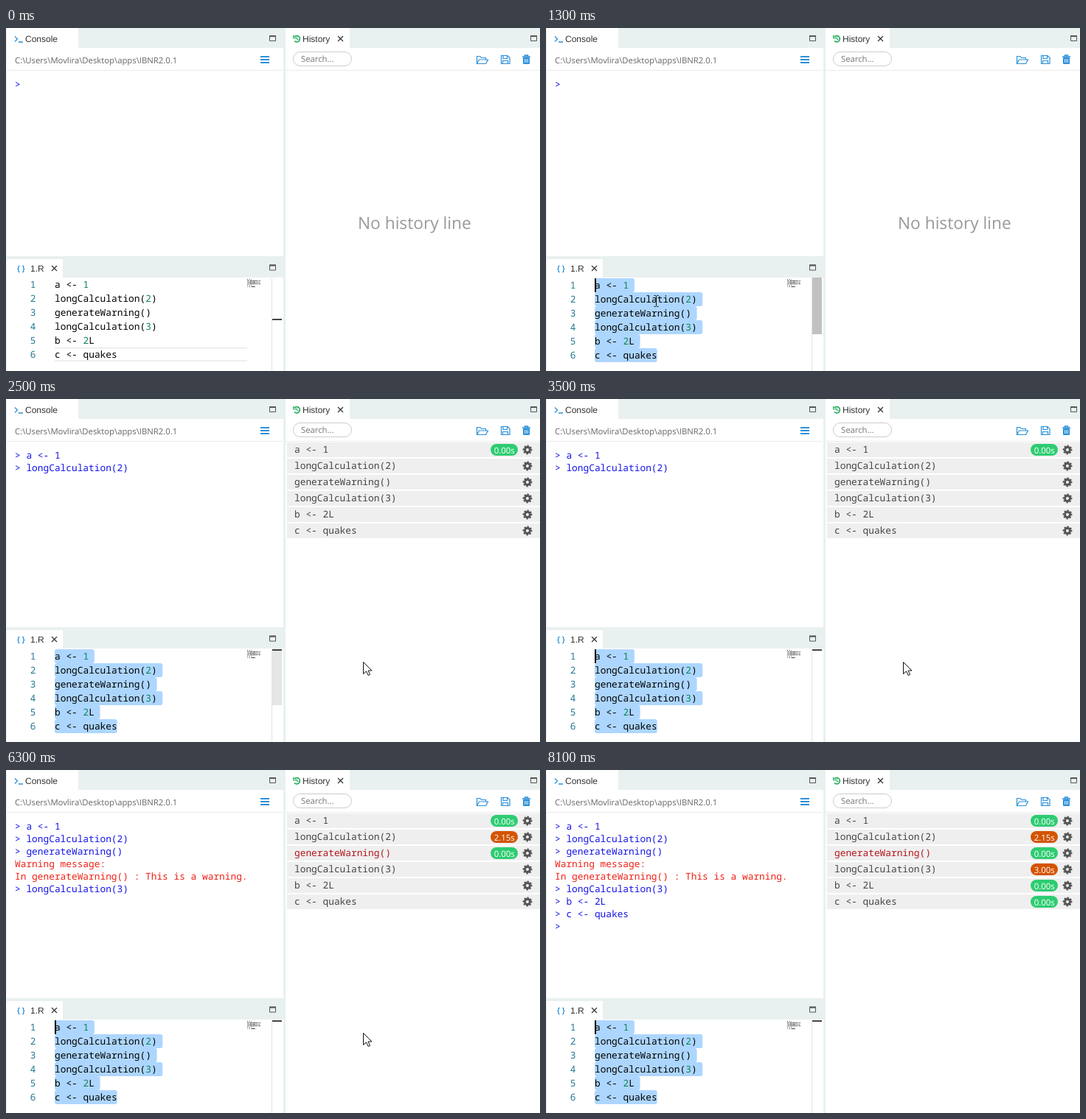
Recreate the animation shown at these times as an HTML page with a canvas. Size 724 by 466 pixels, loop 8200 ms.

```html
<!DOCTYPE html>
<html lang="en">
<head>
<meta charset="utf-8">
<title>Console history</title>
<style>
html, body { margin: 0; width: 100%; height: 100%; overflow: hidden; background: #fff; }
canvas { display: block; }
</style>
</head>
<body>
<canvas id="stage" width="724" height="466"></canvas>
<script>
const ctx = document.getElementById('stage').getContext('2d');
const LOOP = 8200, STEP = 100;
const MONO = '12.83px "Noto Sans Mono", monospace';
const LABEL = '12px "Liberation Sans", Arial, sans-serif';
const sans = size => `${size}px "Open Sans", sans-serif`;
const CHAR = 7.7;
const BLUE = '#2b90d9', BAR = '#e9f0f0';

// Times of the events, in ms
const CLICK = 400, SELECT = 1200, RUN = 1600, WARN = 3600, DONE = 6400;

const code = ['a <- 1', 'longCalculation(2)', 'generateWarning()',
  'longCalculation(3)', 'b <- 2L', 'c <- quakes'];
const timings = [[RUN, '0.00s'], [WARN, '2.15s'], [WARN, '0.00s'],
  [DONE, '3.00s'], [DONE, '0.00s'], [DONE, '0.00s']];
const output = [
  [RUN, '> ' + code[0]], [RUN, '> ' + code[1]], [WARN, '> ' + code[2]],
  [WARN, 'Warning message:'], [WARN, 'In generateWarning() : This is a warning.'],
  [WARN, '> ' + code[3]], [DONE, '> ' + code[4]], [DONE, '> ' + code[5]], [DONE, '>']
];

// Pointer path: time, x, y
const path = [[100, 370, 252], [200, 330, 300], [300, 230, 360], [400, 160, 387],
  [600, 190, 430], [700, 205, 443], [900, 149, 371], [1800, 149, 371], [1900, 215, 384],
  [2000, 307, 386], [2100, 423, 368], [2200, 465, 359], [2300, 484, 357],
  [7200, 484, 357], [7300, 510, 357], [7400, 575, 352], [7600, 694, 268]];

function rect(x, y, w, h, color) {
  ctx.fillStyle = color;
  ctx.fillRect(x, y, w, h);
}

function pill(x, y, w, h, r, fill, stroke) {
  ctx.beginPath();
  ctx.roundRect(x, y, w, h, r);
  if (fill) { ctx.fillStyle = fill; ctx.fill(); }
  if (stroke) { ctx.strokeStyle = stroke; ctx.lineWidth = 1; ctx.stroke(); }
}

function text(str, x, y, font, color, align = 'left') {
  ctx.font = font;
  ctx.textAlign = align;
  ctx.fillStyle = color;
  ctx.fillText(str, x, y);
}

function line(d, color, width = 1, fill) {
  const p = new Path2D(d);
  if (fill) { ctx.fillStyle = fill; ctx.fill(p); }
  ctx.strokeStyle = color;
  ctx.lineWidth = width;
  ctx.stroke(p);
}

function cross(x, y) {
  line(`M${x - 3.5} ${y - 3.5}l7 7m0 -7l-7 7`, '#333', 1.2);
}

function maximize(x, y) {
  line(`M${x - 4} ${y - 3.5}h8v7h-8z`, '#555');
  rect(x - 4.5, y - 4, 9, 2, '#555');
}

function gear(x, y) {
  ctx.strokeStyle = '#555';
  for (const [r, w, dash] of [[3.5, 3, []], [5.4, 2, [2.3, 1.94]]]) {
    ctx.beginPath();
    ctx.setLineDash(dash);
    ctx.lineWidth = w;
    ctx.arc(x, y, r, -0.2, Math.PI * 2 - 0.2);
    ctx.stroke();
  }
  ctx.setLineDash([]);
}

function drawConsole(t) {
  rect(1, 0, 97, 28, '#fff');
  rect(1, 27, 375, 283, '#fff');
  line('M12 11.5l3.5 3.5l-3.5 3.5M17 19h6', BLUE, 1.3);
  text('Console', 26, 19, LABEL, '#333');
  maximize(361.5, 14);
  text('C:\\Users\\Movlira\\Desktop\\apps\\IBNR2.0.1', 12, 48, sans(11.3), '#666');
  for (const y of [38, 42, 46]) rect(345, y, 12, 2, BLUE);
  rect(1, 57, 374, 1, '#ececec');

  const shown = output.filter(([start]) => t >= start);
  if (!shown.length) shown.push([0, '>']);
  shown.forEach(([, str], i) =>
    text(str, 12, 81 + 17 * i, MONO, str[0] === '>' ? '#1414e6' : '#ee2015'));
}

function drawHistory(t) {
  rect(379, 0, 87, 28, '#fff');
  rect(379, 27, 345, 439, '#fff');
  line('M391 12a4.2 4.2 0 1 1 0 5.5', '#27ae60', 1.7);
  line('M389.5 10v4h4zM394.5 12.5v3h2', '#27ae60', 1);
  text('History', 402, 19, LABEL, '#333');
  cross(453.5, 14.5);
  maximize(715.5, 14);
  pill(389.5, 32.5, 79, 19, 10, '#fff', '#ccc');
  text('Search...', 400, 46, sans(11.3), '#777');
  line('M638.5 48v-9.5h4.5l1.5 2h6v2.5M638.5 48.5l3 -5.5h12l-3 5.5z', BLUE, 1.2);
  line('M671.5 37.5h8.5l3 3v8h-11.5zM674 37.5v4h5.5v-4M673.5 48.5v-4h7v4', BLUE, 1.2);
  line('M700 39h11M703.5 38.5v-1.5h4v1.5', BLUE, 1.5);
  line('M701.5 40.5h8v8h-8z', BLUE, 1, BLUE);
  line('M703.5 42v5m2 -5v5m2 -5v5', '#fff', 0.8);
  rect(379, 57, 345, 1, '#ececec');

  if (t < RUN) {
    text('No history line', 477, 273, sans(22.7), '#999');
    return;
  }
  code.forEach((str, i) => {
    const y = 59 + 22 * i, [end, time] = timings[i];
    const warned = i === 2 && t >= end;
    rect(381, y, 343, 20, '#efefef');
    text(str, 391, y + 14, MONO, warned ? '#b5151b' : '#444');
    gear(707, y + 10);
    if (t >= end) {
      pill(657, y + 2, 37, 16, 8, time === '0.00s' ? '#2ecc71' : '#d35400');
      text(time, 675.7, y + 14.5, sans(11.4), '#fff', 'center');
    }
  });
}

function drawScrollbar(t) {
  rect(360, 340, 1, 126, '#e3e3e3');
  const selected = t >= SELECT, clicked = t >= CLICK;
  const alpha = t < 200 ? 0 : t < 2500 ? 0.4 : t < 2600 ? 0.16 : t < 2800 ? 0.07 : 0;
  const top = selected ? 339 : 341;
  rect(361, top, 13, 416 - top, `rgba(100,100,100,${alpha})`);
  if (!clicked) rect(361, 395, 13, 2, '#444');
  else if (!selected) {
    rect(361, 362, 6, 11, '#858585');
    rect(361, 362, 13, 2, '#555');
  } else if (t >= RUN) rect(361, 340, 13, 2, '#444');
}

function drawEditor(t) {
  rect(1, 314, 76, 26, '#fff');
  rect(1, 339, 375, 127, '#fff');
  text('{ }', 15, 330, 'bold 10px "Liberation Sans", Arial, sans-serif', BLUE);
  text('1.R', 33, 331, LABEL, '#333');
  cross(65.5, 326.5);
  maximize(361.5, 325.5);

  const selected = t >= SELECT, shift = selected ? 1 : 0;
  const top = 339 + shift;
  if (!selected) {
    const y = top + 19 * (t < CLICK ? 5 : 2);
    if (t >= CLICK) rect(66, y + 1, 15 * CHAR, 17, '#e9f0fa');
    rect(66, y, 261, 1.5, '#e9e9ee');
    rect(66, y + 17.5, 261, 1.5, '#e9e9ee');
  }
  code.forEach((str, i) => {
    const y = top + 19 * i;
    if (selected) pill(66, y, (str.length + (i < 5)) * CHAR, 19, 3, '#add6ff');
    text(i + 1, 40.5, y + 14, MONO, '#237893', 'right');
    [...str].forEach((ch, k) =>
      text(ch, 66 + k * CHAR, y + 14, MONO, /\d/.test(ch) ? '#098658' : '#000'));
    // Minimap
    [...str].forEach((ch, k) => {
      if (ch !== ' ')
        rect(327 + k, 341 + 2 * i, 1, 1, `rgba(0,0,0,${0.35 + ch.charCodeAt(0) * 7 % 10 / 22})`);
    });
  });

  const blinkOn = t < 1700 || (t - 2565 + 920) % 920 < 445;
  if (selected && blinkOn) rect(66, 340, 2, 19, '#000');
  if (!selected && t >= CLICK) rect(158, 377, 2, 19, '#000');
  drawScrollbar(t);
}

function drawPointer(t) {
  const next = path.findIndex(([time]) => time > t);
  if (next < 1) return;
  const [t0, x0, y0] = path[next - 1], [t1, x1, y1] = path[next];
  const k = (t - t0) / (t1 - t0);
  const x = Math.round(x0 + (x1 - x0) * k), y = Math.round(y0 + (y1 - y0) * k);
  if (t >= 300 && t < 2000)
    line(`M${x - 2.5} ${y - 7.5}h2l1 1l1 -1h2m-3 1v13m-3 1h2l1 -1l1 1h2`, '#111');
  else
    line(`M${x + .5} ${y + .5}v16l4 -3.7l2.6 5.7l2.4 -1l-2.5 -5.5h5z`, '#111', 1, '#fff');
}

function draw(t) {
  ctx.textRendering = 'geometricPrecision';
  rect(0, 0, 724, 466, BAR);
  drawConsole(t);
  drawHistory(t);
  drawEditor(t);
  drawPointer(t);
}

const start = performance.now();
function tick() {
  const t = (performance.now() - start) % LOOP;
  draw(Math.floor(t / STEP) * STEP);
  requestAnimationFrame(tick);
}
tick();
</script>
</body>
</html>
```
